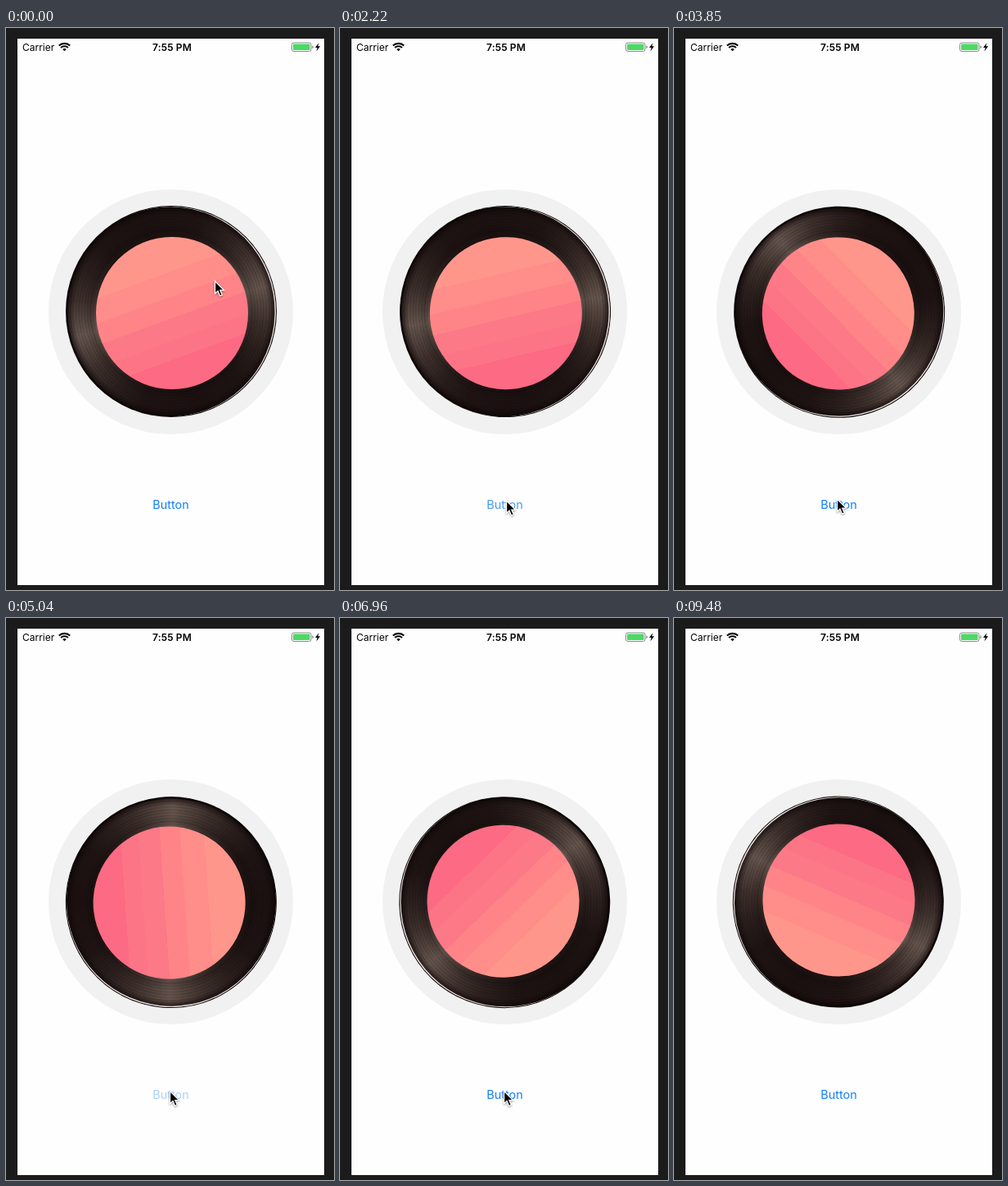
Recreate the animation shown at these times as an HTML page. Size 401 by 686 pixels, loop 9.8 s.

```html
<!DOCTYPE html>
<html lang="en">
<head>
<meta charset="utf-8">
<title>Spinning record</title>
<style>
  html, body { margin: 0; width: 100%; height: 100%; overflow: hidden; background: #1b1b1b; }
  svg { position: absolute; left: 0; top: 0; }
  text { font-family: Inter, "Liberation Sans", sans-serif; }
  #disc, #disc i { position: absolute; border-radius: 50%; }
  #disc {
    left: 73px; top: 217px; width: 258px; height: 258px;
    transform-origin: 128.5px 129.5px;
    background:
      radial-gradient(closest-side, #0000 74%, #0002 76%, #0000 83%, #0000 92%, #0d060699 97.5%, #0d0606 98.5%),
      repeating-radial-gradient(circle, #00000024 0 1px, #0000 2px 3px, #0000001a 4px 5px, #0000 6px 7px),
      repeating-conic-gradient(from 75deg, #66554e 0, #54453f 9deg, #3e302c 22deg, #2c201e 38deg,
        #1f1413 58deg, #1b1110 90deg, #1f1413 122deg, #2c201e 142deg, #3e302c 158deg, #54453f 171deg, #66554e 180deg);
  }
  #rim { inset: 1px; transform: rotate(-10deg); box-shadow: inset -1.5px 0 .4px #e9dfdc; }
  #label {
    left: 37px; top: 38px; width: 186px; height: 186px;
    background: linear-gradient(160deg, #ff968b 71px, #ff8d89 0 100px, #ff8487 0 125px,
      #fc7987 0 151px, #fc7586 0 173px, #fd6a83 0);
  }
</style>
</head>
<body>
<svg width="401" height="686">
  <rect x="14" y="13" width="375" height="667" fill="#fefefe"/>
  <circle cx="201.5" cy="346.5" r="149.5" fill="#f1f1f1"/>
  <text x="20" y="28" font-size="12">Carrier</text>
  <g fill="none" stroke="#000" stroke-width="2.1">
    <path d="M64.8 21.6a9.6 9.6 0 0 1 13.4 0M67.1 24.1a6.3 6.3 0 0 1 8.8 0"/>
    <path d="M71.5 28.3l-2.3-2.3a3.3 3.3 0 0 1 4.6 0z" fill="#000" stroke="none"/>
  </g>
  <text x="203" y="27.5" font-size="12" font-weight="600" letter-spacing=".15" text-anchor="middle">7:55 PM</text>
  <rect x="349.5" y="18" width="23.5" height="10.5" rx="2.5" fill="none" stroke="#8b8b8b"/>
  <rect x="351" y="19.5" width="20.5" height="7.5" rx="1" fill="#4cd964"/>
  <path d="M374.3 21.3q1.6.4 1.6 2t-1.6 2z" fill="#8b8b8b"/>
  <path d="M382.6 18l-4.6 6h2.7l-1.3 4.5 4.7-6.2h-2.8z"/>
  <text id="button" x="201.5" y="586.8" font-size="14.4" fill="#0f7ffa" text-anchor="middle">Button</text>
</svg>
<div id="disc"><i id="rim"></i><i id="label"></i></div>
<svg width="401" height="686">
  <path id="cursor" d="M0 0V15.3L3.5 12.1L6 18L8.8 16.8L6.3 11.1H11Z" stroke="#fff" stroke-width="1.3"
    style="filter: drop-shadow(0 1px 1px #0006)"/>
</svg>
<script>
const LOOP = 9800, STEP = 147.85, LAST_STEP = 64;
const SPEED = 36 / 1000;                     // degrees per ms
const taps = [[1900, 2034], [4880, 4980], [5500, 5560], [8725, 8812]];  // press, release
const path = [                               // time, x, y of the pointer tip
  [0, 255.5, 309], [450, 244, 355], [592, 244, 355], [1780, 202.5, 577],
  [2220, 203.5, 577], [2970, 200, 576], [3850, 199.5, 575], [4300, 200.5, 577.5],
  [8872, 200.5, 577.5], [9019, 207, 606], [9167, 250, 634], [9315, 335, 673], [9463, 430, 710]
];
const [disc, button, cursor] = ["disc", "button", "cursor"].map(id => document.getElementById(id));
const clamp = (v, lo, hi) => Math.min(hi, Math.max(lo, v));

function angle(t) {
  const run = (from, to) => clamp(t, from, to) - from;
  return SPEED * (run(taps[0][1], taps[1][1]) + run(taps[2][1], taps[3][1]));
}

function buttonAlpha(t) {
  const tap = taps.findLast(([press]) => t >= press);
  return tap ? clamp(.2 + .8 * (t - tap[1]) / 250, .2, 1) : 1;
}

function pointer(t) {
  const i = path.findIndex(([time]) => time > t);
  if (i < 0) return path.at(-1).slice(1);
  const [t0, x0, y0] = path[i - 1], [t1, x1, y1] = path[i];
  const u = (t - t0) / (t1 - t0), e = u * u * (3 - 2 * u);
  return [x0 + (x1 - x0) * e, y0 + (y1 - y0) * e];
}

function draw() {
  const t = STEP * Math.min(LAST_STEP, Math.floor(performance.now() % LOOP / STEP));
  disc.style.transform = `rotate(${angle(t)}deg)`;
  button.setAttribute("opacity", buttonAlpha(t));
  cursor.setAttribute("transform", `translate(${pointer(t)})`);
  requestAnimationFrame(draw);
}
draw();
</script>
</body>
</html>
```
